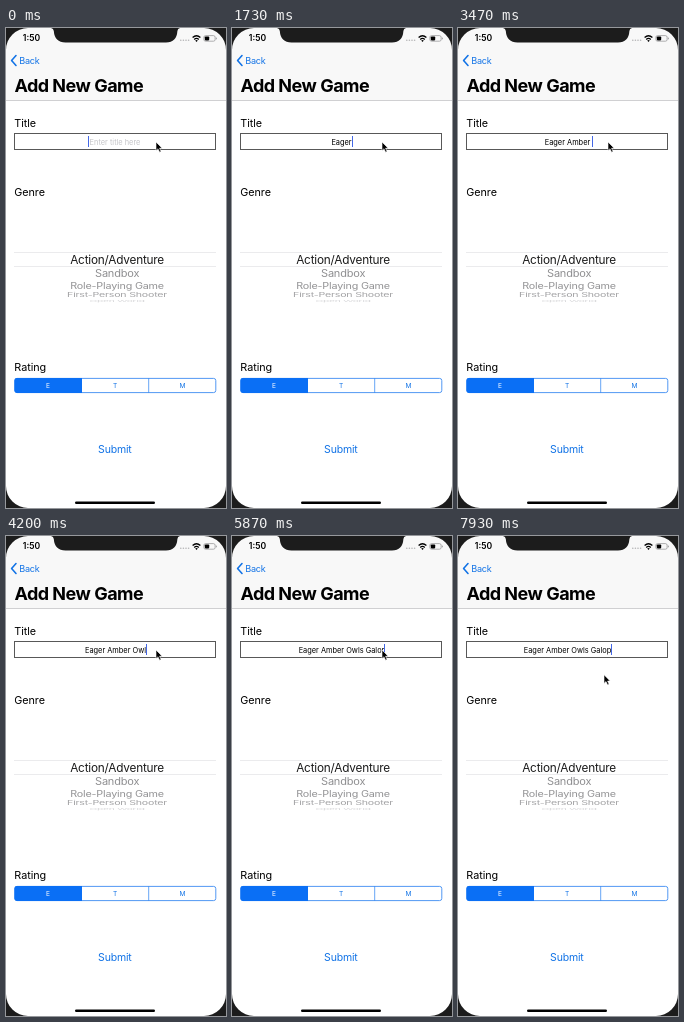
Recreate the animation shown at these times as an HTML page. Size 220 by 480 pixels, loop 8 s.

```html
<!DOCTYPE html>
<html lang="en">
<head>
<meta charset="utf-8">
<title>Add New Game</title>
<style>
  html, body { margin: 0; width: 100%; height: 100%; overflow: hidden; background: #fff; }
  svg { display: block; width: 220px; height: 480px; }
  text { font-family: Inter, "Liberation Sans", sans-serif; font-optical-sizing: none; white-space: pre; }
  .mid { text-anchor: middle; }
  .blue { fill: #1273e6; }
  .label { font-size: 10.8px; letter-spacing: -.005em; }
  .row { letter-spacing: -.018em; text-anchor: middle; }
  .small { font-size: 7.4px; text-anchor: middle; }
  .seg { font-size: 6.6px; text-anchor: middle; }
</style>
</head>
<body>
<svg viewBox="0 0 220 480">
  <rect width="220" height="480" fill="#fff"/>

  <!-- navigation bar -->
  <rect width="220" height="72" fill="#f8f8f8"/>
  <rect y="72" width="220" height="1" fill="#d0d0d2"/>
  <text class="mid" x="25.5" y="13.2" font-size="8.6" font-weight="600">1:50</text>
  <path d="M10 27.5L5.6 32.5L10 37.5" fill="none" stroke="#1273e6" stroke-width="1.6" stroke-linecap="round" stroke-linejoin="round"/>
  <text class="blue" x="13.2" y="35.9" font-size="9.1" letter-spacing="-.2">Back</text>
  <text x="8.4" y="64" font-size="18" font-weight="700" letter-spacing="-.5">Add New Game</text>

  <!-- status icons -->
  <g fill="#b4b4b6">
    <circle cx="174.8" cy="12.3" r=".8"/><circle cx="177.4" cy="12.3" r=".8"/>
    <circle cx="180" cy="12.3" r=".8"/><circle cx="182.6" cy="12.3" r=".8"/>
  </g>
  <g fill="none" stroke="#000" stroke-width="1.3">
    <path d="M186.6 9.6Q190.5 6 194.4 9.6"/>
    <path d="M188.2 11.4Q190.5 9.3 192.8 11.4"/>
  </g>
  <path d="M189.2 12.5Q190.5 11.4 191.8 12.5L190.5 13.9Z"/>
  <rect x="197.9" y="7.6" width="11.2" height="5.6" rx="1.6" fill="none" stroke="#8e8e90" stroke-width=".7"/>
  <rect x="198.8" y="8.4" width="4.4" height="4" rx=".8"/>
  <path d="M209.9 9.3v2.2q.9-.3 .9-1.1t-.9-1.1" fill="#8e8e90"/>

  <!-- title -->
  <text class="label" x="8.3" y="98.6">Title</text>
  <rect x="8.5" y="105.5" width="201" height="16" fill="#fff" stroke="#585858"/>
  <text class="small" x="109" y="116.6" fill="#c5c5c8" id="hint">Enter title here</text>
  <text class="small" x="109.5" y="116.6" id="typed"></text>
  <rect id="caret" y="108" width="1" height="11" fill="#4468e6"/>

  <!-- genre picker -->
  <text class="label" x="8.3" y="168.2">Genre</text>
  <path d="M8 224.5H210M8 238.5H210" stroke="#ebebed"/>
  <g id="picker"></g>

  <!-- rating -->
  <text class="label" x="8.3" y="342.6">Rating</text>
  <rect x="8.8" y="350.4" width="201" height="14.2" rx="2.2" fill="#fff" stroke="#3f8df2" stroke-width=".9"/>
  <path d="M76 350v15h-65.2q-2.4 0-2.4-2.4v-10.2q0-2.4 2.4-2.4z" fill="#0a6ff5"/>
  <path d="M142.7 350v15" stroke="#3f8df2" stroke-width=".8"/>
  <text class="seg" x="42" y="360" fill="#fff">E</text>
  <text class="seg blue" x="109.2" y="360">T</text>
  <text class="seg blue" x="176.4" y="360">M</text>

  <text class="mid blue" x="108.8" y="424.9" font-size="10.5" letter-spacing="-.2">Submit</text>

  <!-- device outline -->
  <rect x="69" y="473.4" width="80" height="2.6" rx="1.3"/>
  <g fill="#1c1c1c">
    <path d="M45 0Q47.6 .4 47.8 3Q48.6 14.4 59.5 14.4H160Q170.7 14.4 171.4 3Q171.6 .4 174 0Z"/>
    <path d="M0 0H22A22 22 0 0 0 0 22ZM220 0V22A22 22 0 0 0 198 0ZM0 480V458A22 22 0 0 0 22 480ZM220 480H198A22 22 0 0 0 220 458Z"/>
  </g>

  <path id="pointer" d="M0 0V8.6L2 6.8L3.6 10.2L5.1 9.5L3.6 6.2H6.2Z" stroke="#fff" stroke-width=".6" stroke-linejoin="round"/>
</svg>
<script>
const LOOP = 8000;
const $ = id => document.getElementById(id);
const hint = $('hint'), typed = $('typed'), caret = $('caret'), pointer = $('pointer');

// picker rows: text, baseline, size, vertical squash, colour
const rows = [
  ['Action/Adventure', 236.4, 11.8, 1, '#1c1c1c'],
  ['Sandbox', 249, 11, .88, '#8e8e90'],
  ['Role-Playing Game', 260.8, 10.8, .78, '#929294'],
  ['First-Person Shooter', 269.3, 10.6, .55, '#a2a2a4'],
  ['Open World', 273.6, 10.2, .24, '#d6d6d8']
];
for (const [label, y, size, squash, fill] of rows) {
  const el = document.createElementNS('http://www.w3.org/2000/svg', 'text');
  el.textContent = label;
  el.setAttribute('class', 'row');
  el.setAttribute('font-size', size);
  el.setAttribute('fill', fill);
  el.setAttribute('transform', `translate(111.1 ${y}) scale(1 ${squash})`);
  $('picker').append(el);
}

// keystrokes and their times; '<' is backspace
const keys = 'Eager Amber Owls Galor<<op';
const keyTimes = [870, 1070, 1470, 1600, 1730, 1930, 2330, 2530, 2670, 2800, 2930, 3470, 3730,
  4000, 4200, 4530, 4870, 5270, 5470, 5600, 5730, 5870, 6530, 6730, 7330, 7470];
const blink = [[0, 1], [200, .66], [270, .33], [330, 0], [670, .5], [730, 1]];
const moves = [[0, 150, 114], [6270, 153, 116], [6330, 157, 118.5], [6400, 161, 121.3], [7930, 146, 138.8]];

const stepAt = (steps, t) => steps.filter(s => s[0] <= t).pop();

function textAt(t) {
  let out = '';
  keyTimes.forEach((k, i) => {
    if (k <= t) out = keys[i] === '<' ? out.slice(0, -1) : out + keys[i];
  });
  return out;
}

let shown = null;
function show(text) {
  if (text === shown) return;
  shown = text;
  const word = text.trimEnd();
  typed.textContent = word;
  hint.style.display = text ? 'none' : '';
  // a trailing space moves the caret but not the centred text
  const gap = text === word ? 0 : 2.1;
  const x = text ? 109.5 + typed.getComputedTextLength() / 2 + gap : 82;
  caret.setAttribute('x', Math.round(x));
}

function draw(t) {
  show(textAt(t));
  caret.setAttribute('opacity', stepAt(blink, t)[1]);
  const [, x, y] = stepAt(moves, t);
  pointer.setAttribute('transform', `translate(${x} ${y})`);
}

const start = performance.now();
function tick() {
  draw((performance.now() - start) % LOOP);
  requestAnimationFrame(tick);
}
tick();
</script>
</body>
</html>
```
